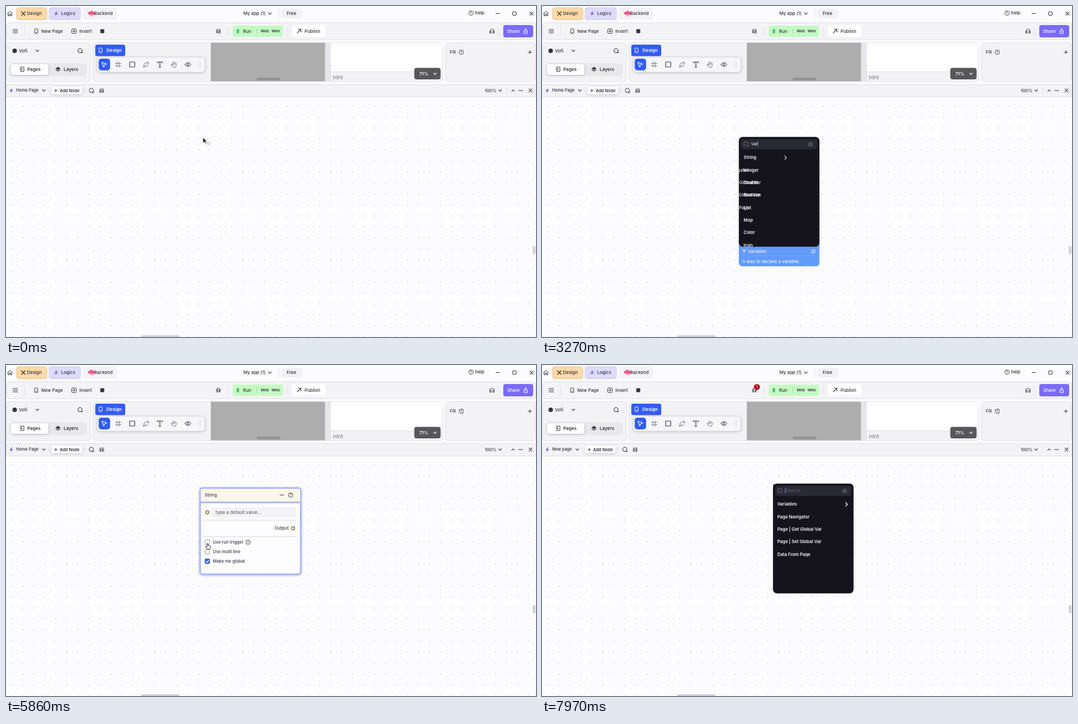
An HTML page that plays this animation: 947x591 px, repeating every 8 s.

```html
<!DOCTYPE html>
<html lang="en">
<head>
<meta charset="utf-8">
<title>Node editor</title>
<style>
  html, body { margin: 0; width: 100%; height: 100%; overflow: hidden; background: #fcfbfd; }
  svg { display: block; }
  #stage { width: 100vw; height: 100vh; }
  text { font-family: Inter, sans-serif; white-space: pre; }
  .lift { filter: drop-shadow(0 1px 2px #0003); }
</style>
</head>
<body>
<svg id="stage" viewBox="0 0 947 591">
  <defs>
    <pattern id="dots" x="0.6" y="168.7" width="19.64" height="19.63" patternUnits="userSpaceOnUse">
      <circle cx="9.8" cy="9.8" r="1.15" fill="#e2deea"/>
    </pattern>
  </defs>
  <g id="base"></g>
  <g id="scene"></g>
</svg>
<script>
const LOOP = 8000;
const INK = '#34333c', GREY = '#77767f', BLUE = '#345cf2', RED = '#b30b1a', EDGE = '#dfdee6';

// ---- drawing helpers (text y is the vertical middle) ----
const text = (x, y, s, size = 8, weight = 500, fill = INK) =>
  `<text x="${x}" y="${y + size * 0.36}" font-size="${size}" font-weight="${weight}" fill="${fill}">${s}</text>`;
const rect = (x, y, w, h, r, fill, stroke = 'none', sw = 1, more = '') =>
  `<rect x="${x}" y="${y}" width="${w}" height="${h}" rx="${r}" fill="${fill}" stroke="${stroke}" stroke-width="${sw}" ${more}/>`;
const path = (d, stroke = INK, sw = 1, fill = 'none') =>
  `<path d="${d}" fill="${fill}" stroke="${stroke}" stroke-width="${sw}" stroke-linejoin="round" stroke-linecap="round"/>`;
const circle = (x, y, r, fill, stroke = 'none', sw = 1) =>
  `<circle cx="${x}" cy="${y}" r="${r}" fill="${fill}" stroke="${stroke}" stroke-width="${sw}"/>`;
const at = (x, y, body, more = '') => `<g transform="translate(${x} ${y})" ${more}>${body}</g>`;
const clip = (x, y, w, h, body) => `<svg x="${x}" y="${y}" width="${w}" height="${h}" overflow="hidden">${body}</svg>`;
const line = (x1, y1, x2, y2, c = EDGE, sw = 1) => path(`M${x1} ${y1}L${x2} ${y2}`, c, sw);

// ---- icons, centred on x, y ----
const down = (x, y, c = INK) => at(x, y, path('M-2.6 -1.3L0 1.3L2.6 -1.3', c, 1.1));
const up = (x, y) => at(x, y, path('M-2.4 1.2L0 -1.2L2.4 1.2', INK, 1.1));
const right = (x, y) => at(x, y, path('M-1.5 -3L1.5 0L-1.5 3', '#fff', 1.3));
const plus = (x, y, r = 3) => at(x, y, path(`M${-r} 0H${r}M0 ${-r}V${r}`, INK, 1));
const cross = (x, y, r = 2.8) => at(x, y, path(`M${-r} ${-r}L${r} ${r}M${r} ${-r}L${-r} ${r}`, INK, 1.1));
const search = (x, y, c = INK) => at(x, y, circle(-.3, -.3, 3.7, 'none', c, 1.1) + path('M2.5 2.5L4 4', c, 1.1));
const bolt = (x, y, c = '#7a5cf0') => at(x, y, path('M1 -4L-2.8 .8H-.3L-1 4L2.8 -.8H.3Z', c, .4, c));
const help = (x, y) => at(x, y, circle(0, 0, 4, 'none', INK, .9) + text(-1.7, 0, '?', 6, 600));
const dots3 = (x, y) => [-2.6, 0, 2.6].map(d => circle(x + d, y, .9, INK)).join('');
const bug = (x, y) => at(x, y, rect(-2.3, -2.6, 4.6, 6, 2.2, 'none', INK, 1) +
  path('M-1.5 -2.8L-2.5 -4M1.5 -2.8L2.5 -4M-4 -1.8L-2.3 -.8M4 -1.8L2.3 -.8M-4 .8H4M-4 3.5L-2 2.2M4 3.5L2 2.2', INK, .9));
const phone = (x, y, c = INK) => at(x, y, rect(-2.8, -4, 5.6, 8, 1.2, 'none', c, 1) + path('M-.7 2.3H.7', c, .9));
const house = (x, y, c, fill = 'none') => at(x, y, path('M-4.2 0L0 -4L4.2 0M-3.2 -.8V4H-1V1H1V4H3.2V-.8', c, 1, fill));

function topBars() {
  return rect(0, 0, 947, 591, 0, '#fcfbfd') + rect(0, 162, 947, 429, 0, 'url(#dots)') +
    house(7, 13.5, INK) +
    rect(19, 3, 54, 21.5, 4, '#fcd9a9', '#edc48c') + at(31, 13.5, path('M-3 -3L3 3M3 -3L-3 3', '#59401d', 1.7)) + text(37.5, 13.5, 'Design') +
    rect(77, 3, 56, 21.5, 4, '#dedafb', '#d0caf5') + bolt(89.5, 13.5) + text(98.5, 13.5, 'Logics') +
    rect(138, 3, 61, 21.5, 4, '#f3f2f5') +
    path('M148.5 15C145.5 14 146.5 10.5 149.5 11C151 8 156 8.5 156.5 11.5C160 11.5 160 15 157.5 15Z', '#f0588e', 1, '#f0588e') +
    path('M152 15V18M155 15V18', '#f0588e', 1.1) + text(157.5, 13.5, 'Backend') +
    text(424, 13.5, 'My app (1)') + down(471.5, 13.5) + line(487, 5, 487, 22) +
    rect(492, 5, 37, 17, 4, '#f2f1f4') + text(501.5, 13.5, 'Free', 8.2) +
    help(831, 12.5) + text(838, 12.5, 'help', 8.2) +
    line(875.5, 13.5, 882, 13.5, INK) + rect(905.5, 10.5, 6, 6, .5, 'none', INK) + cross(939, 13.5) +
    rect(.5, 30, 946, 30, 5, '#f4f3f6', EDGE) +
    path('M12.5 42H20.5M12.5 45H20.5M12.5 48H20.5', INK, 1) + line(33, 37, 33, 53) +
    phone(54, 45) + text(63, 45, 'New Page') +
    rect(117.5, 41, 8, 8, 1.5, 'none', INK) + plus(121.5, 45, 2) + text(131, 45, 'Insert', 8.2) +
    rect(168.5, 41.5, 7, 7, 1, INK) +
    bug(379.5, 45) + line(397, 37, 397, 53) +
    rect(405, 35, 90, 20, 4, '#c5fac3') + rect(412, 41, 4.5, 8, 2.2, '#58bd72') +
    text(423.5, 45, 'Run') + line(448, 40, 448, 50, '#9fd6a0') + text(455, 45, 'Web', 6.8, 600) + text(474.5, 45, 'Web', 6.8, 600) +
    line(503, 37, 503, 53) + rect(511, 34.5, 60, 20.5, 4, '#fff') +
    path('M520.5 48L526.5 42M522 41.5H527V46.5', INK, 1.1) + text(533.5, 45, 'Publish') +
    path('M864.5 45.5A4 4 0 0 1 872.5 45.5V48.5H870V45H872.5M864.5 45.5V48.5H867V45H864.5', INK, 1) +
    line(880, 37, 880, 53) +
    rect(888.5, 34, 53.5, 22, 4, '#7a6bf5') + text(895.5, 45, 'Share', 8.1, 500, '#fff') +
    path('M926.5 44H925.5V49H931.5V44H930.5M928.5 46.5V40.5M926.5 42.2L928.5 40.2L930.5 42.2', '#fff', 1);
}

function panels() {
  const tool = (x, body) => at(x, 104.5, body);
  return rect(.5, 65.5, 150.5, 69.5, 5, '#f3f3f5', EDGE) +
    circle(15.5, 80, 4, '#33323a') + text(23, 80, 'Vofi') + down(56, 80) + search(132.5, 80) +
    rect(7, 102, 137, 23, 5, '#e8e8eb') + rect(8.5, 104, 67, 19, 4, '#fff', 'none', 0, 'class="lift"') +
    path('M26 111V109H32V117H26V115M24.5 113H29M27.7 111.5L29 113L27.7 114.5', INK, 1) + text(38, 113.5, 'Pages', 8, 600) +
    path('M89 111.5L93 109L97 111.5L93 114Z', INK, .5, INK) + path('M89 113.8L93 116.3L97 113.8', INK, 1.1) + text(103, 113.5, 'Layers', 8, 600) +
    rect(155.5, 65.5, 624.5, 69.5, 5, '#f2f2f5', EDGE) +
    rect(366, 65.5, 204, 69, 0, '#adadad') + rect(570, 65.5, 9, 69, 0, '#e6e6e9') + line(570, 66, 570, 134, '#c8c8cb') +
    rect(447.5, 128, 42.5, 4.5, 2, '#929292') +
    path('M579.5 66H776Q779.5 66 779.5 70V117H579.5Z', 'none', 0, '#fefefe') +
    line(579.5, 117.5, 779.5, 117.5) + line(579.5, 66, 579.5, 134) + text(584, 128, 'Hint', 9.6, 400, '#77767d') +
    rect(729.5, 110.5, 47, 20.5, 4, '#56565b') + text(738.5, 121, '71%', 8, 600, '#fff') + down(766.5, 121, '#fff') +
    rect(159.5, 69, 53.5, 20.5, 3.5, BLUE) + phone(169, 79, '#fff') + text(179.5, 79, 'Design', 8.1, 600, '#fff') +
    rect(163, 91.5, 192.5, 26.5, 6, '#f6f6f9', '#dcdbe6', 1, 'class="lift"') +
    rect(165.5, 94, 20.5, 21, 5, BLUE) +
    tool(175.5, path('M-4 -4L4.5 -1L.8 .8L-1 4.5Z', '#fff', 1.1)) +
    tool(200.5, path('M-2 -5V5M2.2 -5V5M-5 -2H5M-5 2.2H5', GREY, .9)) +
    tool(225.5, rect(-4.5, -4.5, 9, 9, 1, 'none', INK, 1.2)) +
    tool(250, path('M-4.5 5L-3 -1.5L2 -3.5L4.5 -1L2.5 3L-4.5 5L0 .5M2 -3.5L3 -5L5.5 -2.3L4.5 -1', GREY, .9)) +
    tool(275, path('M-4.5 -3V-4.5H4.5V-3M0 -4.5V5M-1.7 5H1.7', INK, 1.2)) +
    tool(300, path('M-2.5 1V-3.5M-.3 0V-4.8M1.9 0V-4M-2.5 1L-4.6 -.5Q-5.5 .3 -3.8 2.3Q-2 5.2 .6 5.2Q4.2 5.2 4.2 1.5V-2.5', GREY, 1)) +
    tool(325, path('M-5.5 0Q0 -7.5 5.5 0Q0 7.5 -5.5 0Z', INK, 1) + circle(0, 0, 1.8, 'none', INK)) +
    [-3.5, 0, 3.5].map(d => circle(344.3, 104.5 + d, .8, '#b4b3ba') + circle(347.5, 104.5 + d, .8, '#b4b3ba')).join('') +
    rect(785.5, 65.5, 161, 69.5, 5, '#f3f3f5', EDGE) + text(793, 82.5, 'Fill') + help(813.5, 82.5) + plus(936, 82.5) +
    path('M0 162V144Q0 140 4 140H943Q947 140 947 144V162Z', EDGE, 1, '#f3f3f5') +
    text(855.5, 151, '100%', 7.8) + down(883, 151) + line(894.5, 147, 894.5, 155) + up(906, 151) + dots3(919.8, 151) + cross(937.3, 151) +
    rect(941.3, 429, 4.7, 14, 1, '#d3d3d6') + rect(241.5, 588, 68.5, 4, 1, '#cfcfd2');
}

function pageBar(name, dx) {
  return bolt(9.5, 151) + text(18, 150.5, name, 7.35) + down(67.5 + dx, 151) + line(76 + dx, 147, 76 + dx, 155) +
    rect(81 + dx, 144, 55, 13.5, 3, '#fff', 'none', 0, 'class="lift"') + plus(89 + dx, 151, 2.4) + text(96 + dx, 151, 'Add Node', 7.35, 600) +
    line(141 + dx, 147, 141 + dx, 155) + search(152.8 + dx, 151) + bug(171 + dx, 151);
}

// ---- node search menu ----
const VARS = ['Variables', 'Page Navigator', 'Page | Get Global Var', 'Page | Set Global Var', 'Data From Page'];
const LISTS = {
  '': [...VARS, 'Map | Get Value', 'Json | Get Value', 'List | Add Value'],
  v: ['Variables', 'Map | Get Value', 'Page Navigator', 'Json | Get Value', 'List | Add Value', 'List | Remove At', 'Map | Add Key Value', 'Map | Get All Values'],
  var: VARS
};
LISTS.va = LISTS.v;
const TYPES = ['String', 'Integer', 'Double', 'Boolean', 'List', 'Map', 'Color', 'Icon'];

const rows = (list, x) => list.map((s, i) => text(x, 37 + 22.3 * i, s, 7.8, 600, '#f4f4f7')).join('');

function menu(x, y, t, { opened, query = '', slide = 0, footer = false }) {
  const age = t - opened;
  const reveal = Math.min(196, 24 + age * 0.88);
  const list = LISTS[query];
  const caret = 22 + [0, 4.5, 9, 12.1][query.length];
  let body = rect(0, 0, 144, 196, 7, '#15141d') + rect(4, 4, 136, 18, 4, '#292a33') +
    search(13, 12.7, '#64646d') + house(128, 12.5, '#55555f', '#55555f') +
    (query ? text(22, 12.5, query, 8, 400, '#f2f2f5') : text(22, 12.5, 'Search', 8, 400, '#60606b'));
  if (age % 1000 < 600) body += line(caret, 8.5, caret, 16.5, '#7b98ff', 1);
  let content = '';
  if (slide < 1) content += at(-48 * slide, 0, rows(list, 7.7) + right(131.5, 37), `opacity="${1 - 0.2 * slide}"`);
  if (slide > 0) content += at(144 * (1 - slide), 0, rows(TYPES, 8.3));
  body += clip(0, 0, 144, reveal, content);
  const tip = rect(0, 180, 144, 51, 6, '#629bfa') + text(6.5, 203.5, 'V', 8, 600, '#fff') + text(16, 204.5, 'Variables', 7.8, 400, '#fff') +
    circle(133, 204.5, 3.2, 'none', '#fff') + line(133, 204.3, 133, 206, '#fff', .8) +
    line(6, 212, 138, 212, '#78aafb', .8) + text(6, 222, 'A way to declare a variable.', 7.9, 400, '#fff');
  return at(x, y, (footer ? tip : '') + body);
}

// ---- string node ----
const box = (x, y, on) => on
  ? rect(x - 4.7, y - 4.7, 9.4, 9.4, 2, BLUE) + at(x, y, path('M-2.3 .1L-.7 1.8L2.5 -1.7', '#fff', 1.3))
  : rect(x - 4.2, y - 4.2, 8.4, 8.4, 2, '#fff', '#8d8c95', .9);
const pin = (x, y) => circle(x, y, 2.8, '#fff', '#8a6a10', 1.4);
const play = (x, y) => at(x, y, path('M-3.5 -3L4 0L-3.5 3Z', '#e3a526', 1.2));

function node({ x, y, selected, global, trigger }) {
  const dy = trigger ? 23.5 : 0, h = (selected ? 155 : 153) + (trigger ? 17 : 0);
  const edge = trigger ? '#f6a5a8' : selected ? '#aab8fa' : '#eeedf2';
  const sw = selected ? 3 : 1.5;
  const label = (lx, ly, s) => text(lx, ly, s, 7.55, 600, '#55545d');
  let s = rect(.7, .7, 180, h - 1, 5, '#fdfcfe', edge, sw, 'class="lift"') +
    path(`M2 26V5Q2 2 5 2H176Q179.5 2 179.5 5V26Z`, 'none', 0, '#faf7e8') + line(1, 26.3, 180, 26.3, edge, sw) +
    label(9, 13, 'String') + dots3(146.7, 13.2) + help(162.5, 13.2);
  if (trigger) s += play(14, 45) + label(21, 45, 'Run') +
    path('M37.5 45L44 42V38Q44 35.5 47 35.5H89Q92 35.5 92 38V51.5Q92 54 89 54H47Q44 54 44 51.5V48Z', 'none', 0, RED) +
    text(51.5, 44.7, 'Required', 7.4, 600, '#fff') + help(152, 45) + play(167.5, 45);
  s += at(0, dy, pin(13.7, 44) + rect(21, 35, 151.5, 18, 2, '#f3f2f5') + text(28.5, 44.2, 'type a default value...', 8, 400, '#55545d') +
    line(6, 58, 173, 58, '#d2d1da', .9) + label(134, 72.6, 'Output') + pin(167, 72.6) + line(6, 87.3, 173, 87.3, '#d2d1da', .9) +
    box(13.7, 97.4, trigger) + label(23.5, 97.4, 'Use run trigger') + help(86.5, 97.4) +
    (trigger ? line(95, 94, 95, 101, '#a09fa8', .8) + box(104, 97.4, true) + label(114, 97.4, 'Call S.S.') + help(152, 97.4) : '') +
    box(13.7, 114.5, false) + label(23.5, 114.5, 'Use multi line') +
    box(13.7, 131.4, global) + label(23.5, 131.4, 'Make me global'));
  return at(x, y, s);
}

function dropdown(age) {
  return rect(7, 138, 126, 53.5, 5, '#fdfdfe', '#ececf0', 1, 'class="lift"') + rect(12, 143, 115.5, 18, 3, BLUE) +
    rect(15.5, 148, 7.5, 7.5, 1.5, '#fff') + at(19.2, 151.8, path('M-2 .1L-.6 1.5L2.1 -1.4', BLUE, 1.1)) + text(29, 152, 'Home Page', 7.7, 600, '#fff') +
    `<g opacity="${Math.min(1, Math.max(0, (age - 160) / 100))}">${text(29, 175, 'New page', 7.7, 600)}</g>`;
}

// ---- pointer: time, x, y (hotspot) ----
const TRACK = [
  [0, 352, 235], [2150, 352, 235], [2500, 385, 271], [3600, 385, 271], [3700, 406, 234], [4100, 406, 234],
  [4500, 399, 251], [4950, 360, 353], [5450, 360, 353], [5800, 360, 319], [6050, 360, 319],
  [6500, 40, 151], [6850, 40, 151], [7050, 45, 175], [7300, 45, 175], [7700, 413, 212], [LOOP, 413, 212]
];
const ease = k => k * k * (3 - 2 * k);
function pointer(t) {
  const i = Math.max(1, TRACK.findIndex(p => p[0] > t));
  const [t0, x0, y0] = TRACK[i - 1], [t1, x1, y1] = TRACK[i];
  const k = ease((t - t0) / (t1 - t0));
  return [x0 + (x1 - x0) * k, y0 + (y1 - y0) * k];
}
const ARROW = path('M0 0V9.5L2.3 7.5L3.8 10.8L5.5 10L4 6.9H7Z', '#fff', .5, '#1d1c22');
const SHAPES = {
  menu: ARROW + rect(7.5, 8.5, 5, 3.5, .6, '#fff', '#908f97', .7),
  arrow: ARROW,
  move: path('M-5 0H5M0 -5V5', '#33323a', 1.3) + path('M-3.5 -1.7L-5.3 0L-3.5 1.7M3.5 -1.7L5.3 0L3.5 1.7M-1.7 -3.5L0 -5.3L1.7 -3.5M-1.7 3.5L0 5.3L1.7 3.5', '#33323a', 1.2),
  hand: path('M-1 0Q0 -1.3 1 0V3.5Q3 2.7 4.7 4Q5.6 4.6 5 7.5L4 10H-.5L-3.3 6Q-3.5 4.5 -1 5.5Z', '#2b2a31', 1, '#fff')
};
function shapeAt(t) {
  if (t < 1000) return 'menu';
  if (t >= 3650 && t < 4550) return 'move';
  if (t >= 4900 && t < 6100 || t >= 6400 && t < 7320) return 'hand';
  return 'arrow';
}

function draw(t) {
  const newPage = t >= 7200;
  let s = newPage ? pageBar('New page', -4.5) : pageBar('Home Page', 0);
  if (t >= 5900) s += circle(384, 39.3, 5.4, RED) + text(382.7, 39.3, '1', 6, 500, '#fff');
  if (t >= 3650 && !newPage) {
    const k = ease(Math.min(1, Math.max(0, (t - 4100) / 400)));
    s += node({ x: 352.5 - 6.5 * k, y: 202 + 17 * k, selected: t >= 4100, global: t >= 5280, trigger: t >= 5900 });
  }
  const typing = t >= 1000 && t < 2150;
  if (!typing) s += at(...pointer(t), SHAPES[shapeAt(t)]);
  if (t >= 1000 && t < 3650) {
    const query = t < 1650 ? '' : 'var'.slice(0, t < 1800 ? 1 : t < 2080 ? 2 : 3);
    const k = Math.min(1, Math.max(0, (t - 2880) / 410));
    s += menu(351.7, 233.7, t, { opened: 1000, query, slide: 1 - (1 - k) ** 2, footer: t >= 2500 });
  }
  if (t >= 6550 && !newPage) s += dropdown(t - 6550);
  if (t >= 7850) s += menu(412.7, 211.7, t, { opened: 7850 });
  return s;
}

document.getElementById('base').innerHTML = topBars() + panels();
const scene = document.getElementById('scene');
let shown = '';
function tick() {
  const next = draw(performance.now() % LOOP);
  if (next !== shown) scene.innerHTML = shown = next;
  requestAnimationFrame(tick);
}
tick();
</script>
</body>
</html>
```
